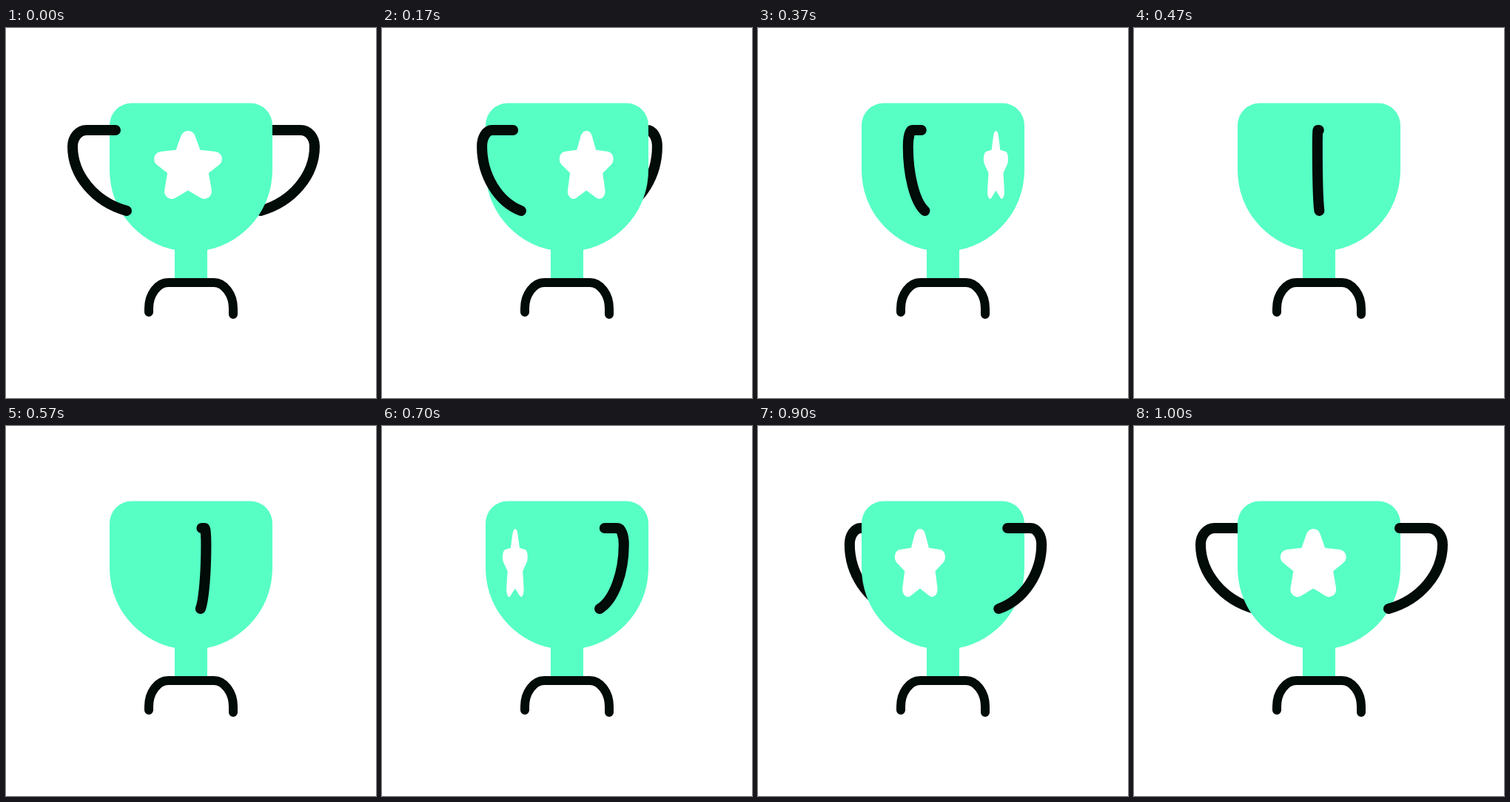
Write an HTML page that moves like this. It is 500 px wide and 500 px high and loops after 1.03 s.

```html
<!DOCTYPE html>
<html lang="en">
<head>
<meta charset="utf-8">
<title>Turning trophy</title>
<style>
  html, body { margin: 0; width: 100%; height: 100%; overflow: hidden; background: #fff; }
  svg { display: block; }
  .line { fill: none; stroke: #010b07; stroke-linecap: round; stroke-linejoin: round; }
  .handle { stroke-width: 14px; vector-effect: non-scaling-stroke; }
  .cup { fill: #57ffc4; }
  #star { fill: #fff; stroke: #fff; stroke-width: 20px; stroke-linejoin: round; }
</style>
</head>
<body>
<svg width="500" height="500" viewBox="0 0 500 500">
  <defs>
    <!-- Handle drawn relative to the turning axis -->
    <path id="shape" class="line handle"
      d="M-105.5 138H-144.5C-155.5 138 -163.5 148 -163.5 160C-163.5 199 -133.5 235 -90.5 247"/>
  </defs>
  <path id="back" class="line handle"/>
  <path class="cup" d="M170 101.5H330A30 30 0 0 1 360 131.5V192A110 110 0 0 1 272 299.8V344H228V299.8A110 110 0 0 1 140 192V131.5A30 30 0 0 1 170 101.5Z"/>
  <path class="line" stroke-width="12" d="M193 384V379C193 360 205 344 219 344H281C295 344 307 360 307 379V387"/>
  <path id="star" d="M0 149L9 174L36 177L17 192L22 221L0 208L-22 221L-17 192L-36 177L-9 174Z"/>
  <path id="front" class="line handle"/>
</svg>
<script>
const LOOP = 1030, AXIS = 253.5;
const get = id => document.getElementById(id);
const [back, front, star] = ["back", "front", "star"].map(get);
for (const handle of [back, front]) handle.setAttribute("d", get("shape").getAttribute("d"));

const place = (el, x, scale) =>
  el.setAttribute("transform", `translate(${x} 0) scale(${scale} 1)`);

// Steps run at 30 per second; every seventh one is skipped.
function stepAt(ms) {
  const step = Math.min(30, Math.floor((ms + 5) * 0.03));
  return step % 7 ? step : step + 1;
}

function draw(ms) {
  const step = stepAt(ms);
  const turn = 1 - 2 * (step - 1) / 29;
  place(front, AXIS, turn);
  place(back, AXIS, -turn);

  // The star leaves on the right, then returns from the left.
  let x, half;
  if (step < 17) {
    const gone = step - 1;
    x = 246 + 7.55 * gone;
    half = 46 - 2 * gone - 0.095 * gone * gone;
  } else {
    const left = 30 - step;
    x = 242.3 - 7.8 * left;
    half = 44.5 - 3.45 * left;
  }
  star.style.display = half > 1 ? "" : "none";
  place(star, x, Math.max(half, 0) / 46);
}

const start = performance.now();
function tick() {
  draw((performance.now() - start) % LOOP);
  requestAnimationFrame(tick);
}
tick();
</script>
</body>
</html>
```
